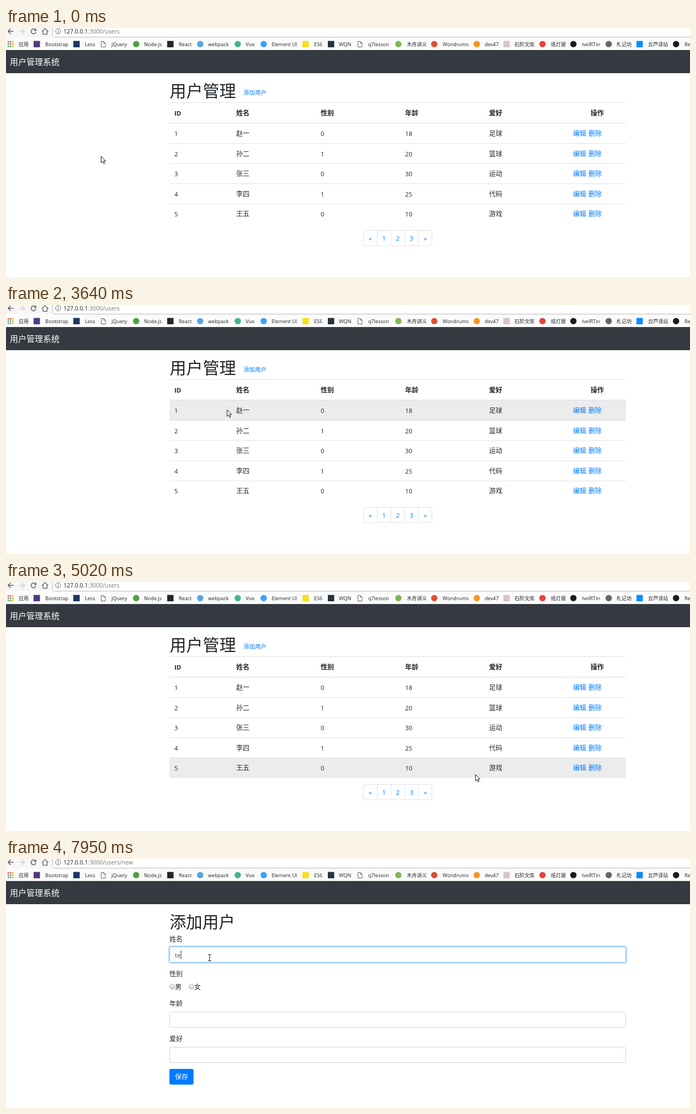
These frames come from a looping animation (1239x452 px, 8000 ms). An HTML page:

```html
<!DOCTYPE html>
<html lang="zh-CN">
<head>
<meta charset="utf-8">
<title>用户管理系统</title>
<style>
  html, body { margin: 0; width: 100%; height: 100%; overflow: hidden; background: #fff; }
  svg { display: block; font-family: "Open Sans", "Noto Sans CJK SC", "Noto Sans CJK", sans-serif; }
  text { white-space: pre; }
  .line { fill: none; stroke: #5a5a5a; stroke-width: 1.4; }
  .field { fill: #fff; stroke: #ced4da; stroke-width: 1; }
  .cursor { fill: #fff; stroke: #000; stroke-width: .9; stroke-linejoin: round; }
</style>
</head>
<body>
<svg width="1239" height="452" viewBox="0 0 1239 452">
  <defs>
    <linearGradient id="radio" x2="0" y2="1">
      <stop stop-color="#f4f4f4"/><stop offset="1" stop-color="#cfcfcf"/>
    </linearGradient>
  </defs>

  <!-- browser bar -->
  <rect width="1239" height="40" fill="#fbfbfb"/>
  <rect width="85" height="16" fill="#f6f6f6"/>
  <path d="M84.5 -2V13.5Q84.5 16.5 87.5 16.5H1240" fill="#fff" stroke="#b9b9b9"/>
  <path d="M87 0H1239V16H87Q85 16 85 13V0Z" fill="#fff"/>
  <path class="line" d="M13.5 6H4M8.5 1.3L3.8 6L8.5 10.7"/>
  <path class="line" style="stroke:#cfcfcf" d="M24 6H33.5M29 1.3L33.7 6L29 10.7"/>
  <g id="reload">
    <path class="line" d="M53.2 3.2A4.4 4.4 0 1 0 54.2 7"/>
    <path d="M55 .8V5.2H50.6Z" fill="#5a5a5a"/>
  </g>
  <path id="stop" class="line" d="M46 2L54 10M54 2L46 10"/>
  <path class="line" style="stroke-width:1.2" d="M65 6.5L70.7 1L76.4 6.5M67 5.5V11.3H74.4V5.5"/>
  <circle cx="94.5" cy="6" r="4.6" fill="none" stroke="#666"/>
  <path d="M94.5 5.3V8.7M94.5 3.2V4.3" stroke="#666" stroke-width="1.2"/>
  <rect id="selection" y="0" height="12" fill="#0078d7"/>
  <text id="url" x="104" y="10" font-size="10.5"><tspan id="host" fill="#222">127.0.0.1</tspan><tspan id="path" fill="#777"></tspan></text>
  <rect id="markHover" x="46" y="19" width="72" height="20" rx="2" fill="#eeeeee"/>
  <g id="marks"></g>

  <rect y="40" width="1239" height="42" fill="#343a40"/>
  <g id="brand"></g>

  <g id="listPage">
    <rect id="rowHover" x="296" width="827" height="36.6" fill="#ececec"/>
  </g>
  <g id="formPage">
    <rect id="glow" x="294.8" y="158.3" width="829.4" height="30.4" rx="4" fill="none" stroke="#bfdeff" stroke-width="2.4"/>
  </g>

  <g id="arrow" class="cursor"><path d="M.4 .4V12.2L3.1 9.7L5.1 14L6.9 13.2L5 9H8.7Z"/></g>
  <g id="hand" class="cursor"><path d="M-1.3 8.5V1Q0 -.6 1.3 1V6Q2.6 5 3.6 6.4Q5 5.7 5.7 7Q7 6.8 7 8.3V12.5L5.4 16.5H-1.6L-5 10.5Q-4.4 8.6 -2.7 10L-1.3 11.5Z"/></g>
  <g id="beam"><path d="M-3 -5.7H-1Q0 -5.7 0 -4.7V4.7Q0 5.7 -1 5.7H-3M3 -5.7H1Q0 -5.7 0 -4.7M0 4.7Q0 5.7 1 5.7H3" fill="none" stroke="#222" stroke-width="1.1"/></g>
</svg>

<script>
const $ = id => document.getElementById(id);
const INK = '#212529', LINK = '#007bff', RULE = '#dee2e6';

function add(parent, tag, attrs, content = '') {
  const el = document.createElementNS('http://www.w3.org/2000/svg', tag);
  for (const key in attrs) el.setAttribute(key, attrs[key]);
  el.textContent = content;
  return parent.appendChild(el);
}
const label = (parent, x, y, content, size = 12, fill = INK, extra = {}) =>
  add(parent, 'text', { x, y, 'font-size': size, fill, ...extra }, content);
const rule = (parent, y, width = 1) =>
  add(parent, 'path', { d: `M296 ${y}H1123`, stroke: RULE, 'stroke-width': width });

// Bookmarks: icon x, text x, label, icon colour, round or square; no colour means a blank sheet
const bookmarks = [
  [50, 71, 'Bootstrap', '#4f3b7a'], [122, 143, 'Less', '#1d365d'], [171, 191, 'jQuery'],
  [230, 250, 'Node.js', '#539e43', 1], [292, 313, 'React', '#20262b'],
  [346, 366, 'webpack', '#5aa5dc', 1], [414, 434, 'Vue', '#41b883', 1],
  [461, 481, 'Element UI', '#409eff', 1], [537, 558, 'ES6', '#f7df1e'],
  [583, 603, 'WQN', '#26323c'], [636, 656, 'q7lesson'],
  [705, 726, '木舟讲义', '#7fb654', 1], [770, 791, 'Wondrums', '#de4f38', 1],
  [847, 867, 'dev47', '#f7931e', 1], [901, 921, '石阶文库', '#dcc3c3'],
  [966, 987, '纸灯屋', '#e2453c', 1], [1022, 1043, 'IvelRTin', '#1b1b1b', 1],
  [1086, 1106, '札记坊', '#666', 1], [1142, 1163, '云芦译站', '#0a8cff'],
  [1208, 1229, 'Re', '#1b1b1b', 1]
];
const marks = $('marks');
const dots = ['#e2453c', '#e2453c', '#f2a600', '#3a9e4b', '#4285f4', '#f2a600', '#3a9e4b', '#3a9e4b', '#f2a600'];
dots.forEach((fill, i) =>
  add(marks, 'rect', { x: 3 + i % 3 * 4, y: 24 + Math.floor(i / 3) * 4, width: 2.5, height: 2.5, fill }));
label(marks, 23, 33, '应用', 9.1);
for (const [x, textX, name, fill, round] of bookmarks) {
  if (!fill) {
    add(marks, 'path', { d: `M${x + 1.5} 24.5H${x + 6}L${x + 9} 27.5V34.5H${x + 1.5}ZM${x + 6} 24.5V27.5H${x + 9}`,
      fill: '#fff', stroke: '#666' });
  } else {
    add(marks, 'rect', { x, y: 23.5, width: 11.5, height: 11.5, rx: round ? 5.75 : 0, fill });
  }
  label(marks, textX, 33, name, 9.1);
}
label($('brand'), 7, 67.3, '用户管理系统', 15, '#fff');

// User list
const list = $('listPage');
const columns = [305, 417, 570, 723, 875];
const users = [
  [1, '赵一', 0, 18, '足球'], [2, '孙二', 1, 20, '篮球'], [3, '张三', 0, 30, '运动'],
  [4, '李四', 1, 25, '代码'], [5, '王五', 0, 10, '游戏']
];
const rowTop = row => 172.9 + (row - 1) * 36.6;
label(list, 296.5, 125, '用户管理', 30);
label(list, 430, 120.8, '添加用户', 10.5, LINK);
rule(list, 135.5);
rule(list, 172.6, 1.4);
['ID', '姓名', '性别', '年龄', '爱好'].forEach((head, i) =>
  label(list, columns[i], 159, head, i ? 12 : 11.4, INK, { 'font-weight': 700 }));
label(list, 1059, 159, '操作', 12, INK, { 'font-weight': 700 });
users.forEach((user, i) => {
  const y = 196 + i * 36.55;
  if (i) rule(list, rowTop(i + 1));
  user.forEach((cell, c) => label(list, columns[c], y, cell, typeof cell === 'number' ? 11.3 : 12));
  label(list, 1027, y, '编辑', 12, LINK);
  label(list, 1055, y, '删除', 12, LINK);
});
add(list, 'rect', { x: 647.5, y: 367.5, width: 124, height: 27.5, rx: 3, fill: '#fff', stroke: RULE });
['«', '1', '2', '3', '»'].forEach((mark, i) => {
  const x = 647.5 + i * 24.9;
  if (i) add(list, 'path', { d: `M${x} 367.5V395`, stroke: RULE });
  label(list, x + 12.4, 385.6, mark, 11.3, LINK, { 'text-anchor': 'middle' });
});

// New user form
const form = $('formPage');
label(form, 296.5, 125, '添加用户', 29.6);
label(form, 296, 149.5, '姓名');
label(form, 296, 213.3, '性别');
label(form, 296, 267, '年龄');
label(form, 296, 331, '爱好');
const [nameField] = [159.5, 277.5, 341.5].map(y =>
  add(form, 'rect', { class: 'field', x: 296.5, y, width: 826, height: 28, rx: 3 }));
[['男', 301], ['女', 336]].forEach(([sex, cx]) => {
  add(form, 'circle', { cx, cy: 231.8, r: 4.4, fill: 'url(#radio)', stroke: '#a0a0a0', 'stroke-width': .8 });
  label(form, cx + 5, 237, sex);
});
add(form, 'rect', { x: 296, y: 381, width: 43.7, height: 28.5, rx: 3, fill: LINK });
label(form, 306, 400, '保存', 12, '#fff');
const typed = label(form, 306, 178.5, '', 11.5, '#495057');
const caret = add(form, 'rect', { y: 166, width: 1, height: 16, fill: '#333' });

// Pointer: time, x, y and, where it changes, shape
const pointer = [
  [0, 172, 232.5, 'arrow'],
  [560, 168, 222], [697, 150, 170], [834, 118, 95], [971, 92, 44], [1109, 88, 25],
  [1246, 120, 9, 'beam'], [1383, 190, 9], [1520, 233, 9],
  [1650, 200, 9], [1787, 150, 8], [1923, 100, 8], [2060, 63, 8],
  [2470, 76, 28, 'arrow'], [2600, 105, 75], [2720, 140, 125], [2850, 170, 160], [2980, 184, 174],
  [3500, 230, 178], [3640, 400, 190], [3780, 610, 203], [3920, 820, 216], [4060, 960, 225],
  [4190, 1038, 240], [4320, 1059, 256], [4480, 1064, 240],
  [4630, 1040, 290], [4760, 969.5, 332], [4900, 850, 349], [5030, 650, 280], [5170, 480, 170],
  [5300, 431, 121.5, 'hand'], [5440, 436, 116], [5590, 440, 113],
  [6010, 440, 113, 'arrow'], [6150, 430, 125], [6280, 405, 150], [6410, 380, 172, 'beam'], [6550, 368.8, 179]
];
pointer.forEach((p, i) => { p[3] = p[3] || pointer[i - 1][3]; });

const hovers = [[0, 0], [3640, 1], [3920, 2], [4900, 5], [5030, 3], [5170, 0]];
const at = (steps, t) => steps.findLast(step => step[0] <= t);
const within = (t, from, to) => t >= from && t < to;
const show = (el, on) => { el.style.display = on ? '' : 'none'; };

function draw(t) {
  const [, x, y, shape] = at(pointer, t);
  for (const id of ['arrow', 'hand', 'beam']) show($(id), id === shape);
  $(shape).setAttribute('transform', `translate(${x} ${y})`);

  const row = at(hovers, t)[1];
  show($('rowHover'), row);
  if (row) $('rowHover').setAttribute('y', rowTop(row));
  show($('markHover'), within(t, 1109, 1246) || within(t, 2470, 2600));

  // Address selection follows the drag to the left
  const selected = within(t, 1650, 3500);
  const from = t < 2060 ? Math.max(104, x) : 104;
  show($('selection'), selected);
  $('selection').setAttribute('x', from);
  $('selection').setAttribute('width', 207 - from);
  const full = selected && from === 104;
  $('host').setAttribute('fill', full ? '#fff' : '#222');
  $('path').setAttribute('fill', selected && from < 170 ? '#fff' : '#777');

  const onForm = t >= 6010;
  show(list, !onForm);
  show(form, onForm);
  $('path').textContent = ':3000/users' + (onForm ? '/new' : '');
  const loading = within(t, 5870, 6010);
  show($('reload'), !loading);
  show($('stop'), loading);

  show($('glow'), t >= 6840);
  nameField.style.stroke = t >= 6840 ? '#80bdff' : t >= 6690 ? '#c4d0e2' : '';
  const count = t >= 7950 ? 2 : t >= 7820 ? 1 : 0;
  typed.textContent = 'te'.slice(0, count);
  caret.setAttribute('x', [306, 310.2, 316.6][count]);
  show(caret, within(t, 6690, 7240) || count);
}

const start = performance.now();
function tick() {
  draw((performance.now() - start) % 8000);
  requestAnimationFrame(tick);
}
tick();
</script>
</body>
</html>
```
